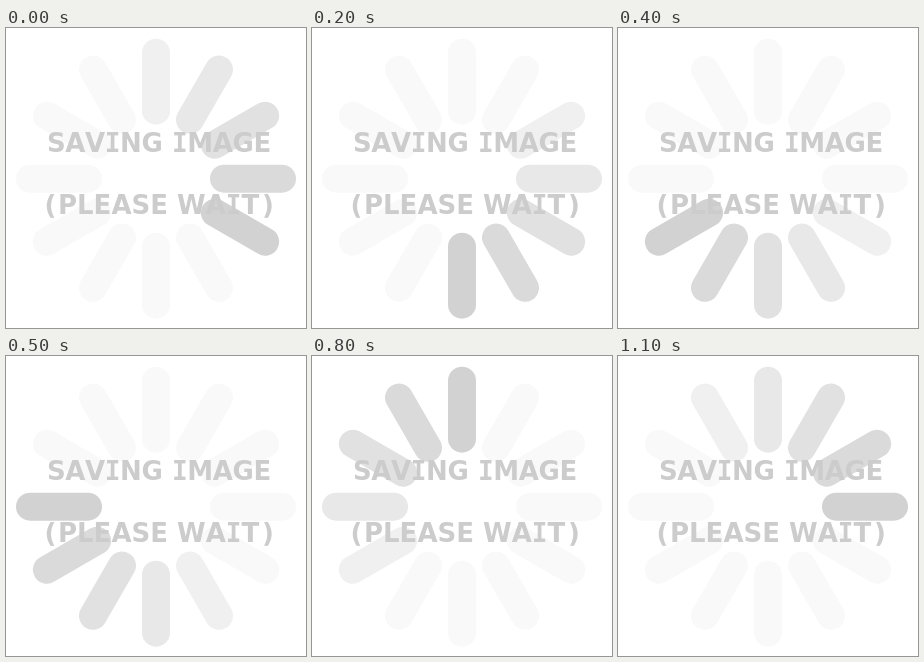
Recreate the animation shown at these times as an HTML page. Size 300 px wide and 300 px high, loop 1200 ms.

```html
<!DOCTYPE html>
<html lang="en">
<head>
<meta charset="utf-8">
<title>Saving</title>
<style>
  html, body { margin: 0; width: 100%; height: 100%; overflow: hidden; background: #fff; }
  svg { display: block; width: 300px; height: 300px; }
  line { stroke-width: 28; stroke-linecap: round; animation: fade 1200ms step-end infinite; }
  text { font: bold 26px "DejaVu Sans", sans-serif; font-kerning: none; fill: #ccc; }
  .tight { letter-spacing: -0.4px; }
  .slab { font-family: "DejaVu Sans Mono", monospace; }

  /* Each spoke darkens at once, then pales in 100 ms steps */
  @keyframes fade {
    0% { stroke: #d2d2d2; }
    8.3333% { stroke: #dadada; }
    16.6666% { stroke: #e1e1e1; }
    24.9999% { stroke: #e8e8e8; }
    33.3333% { stroke: #f0f0f0; }
    41.6666%, 100% { stroke: #f9f9f9; }
  }
</style>
</head>
<body>
<svg viewBox="0 0 300 300">
  <g id="spokes" transform="translate(150 150.7)"></g>
  <text class="tight" y="124"><tspan x="41">SAV<tspan class="slab">I</tspan>NG</tspan> <tspan x="166" class="slab">I</tspan>MAGE</text>
  <text y="186"><tspan x="38.5">(</tspan><tspan x="52">PLEASE</tspan> <tspan x="171">WA<tspan class="slab">I</tspan>T</tspan><tspan x="256">)</tspan></text>
</svg>
<script>
  const count = 12, step = 100;
  const spokes = document.getElementById('spokes');
  for (let i = 0; i < count; i++) {
    const spoke = document.createElementNS('http://www.w3.org/2000/svg', 'line');
    spoke.setAttribute('x1', 68);
    spoke.setAttribute('x2', 126);
    spoke.setAttribute('transform', `rotate(${30 * (i + 1)})`);
    spoke.style.animationDelay = `${(i - count) * step}ms`;
    spokes.append(spoke);
  }
</script>
</body>
</html>
```
